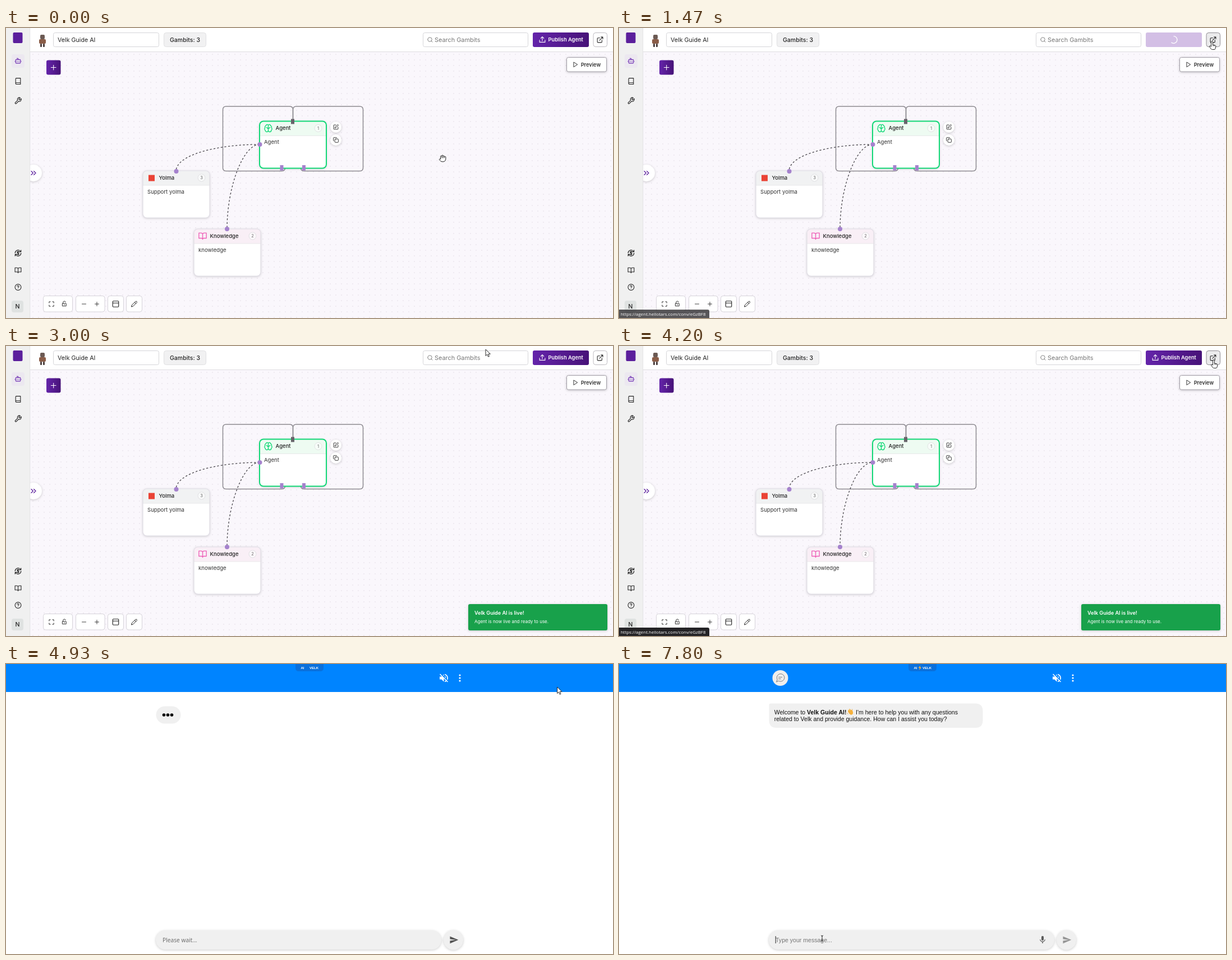
Animation, 1082 px wide and 518 px high, one loop 8 s. Source, as an HTML page:

```html
<!DOCTYPE html>
<html lang="en">
<head>
<meta charset="utf-8">
<title>Publishing an agent</title>
<style>
  html, body { margin: 0; width: 100%; height: 100%; overflow: hidden; background: #fff; }
  svg { display: block; width: 100vw; height: 100vh; }
  text { white-space: pre; }
  .ui { font-family: Inter, sans-serif; }
  .sys { font-family: "Open Sans", "Noto Sans", sans-serif; }
  .chat { font-family: "Liberation Sans", Arial, sans-serif; }
  .soft { filter: drop-shadow(0 1px 2px #0003); }
  .dash { fill: none; stroke: #4a474d; stroke-width: 1.3; stroke-dasharray: 3.3; }
</style>
</head>
<body>
<svg id="stage" viewBox="0 0 1082 518" preserveAspectRatio="none"></svg>
<script>
const LOOP = 8000;
const PURPLE = '#5b1f9c';

const rect = (x, y, w, h, r, fill, stroke = 'none', more = '') =>
  `<rect x="${x}" y="${y}" width="${w}" height="${h}" rx="${r}" fill="${fill}" stroke="${stroke}" ${more}/>`;
const dot = (x, y, r, fill, more = '') =>
  `<circle cx="${x}" cy="${y}" r="${r}" fill="${fill}" ${more}/>`;
const path = (d, fill, stroke = 'none', more = '') =>
  `<path d="${d}" fill="${fill}" stroke="${stroke}" ${more}/>`;
const text = (s, x, y, size, fill = '#222', weight = 400, cls = 'ui', more = '') =>
  `<text class="${cls}" x="${x}" y="${y}" font-size="${size}" fill="${fill}" font-weight="${weight}" ${more}>${s}</text>`;
const group = (id, body) => `<g id="${id}">${body}</g>`;

// Icons live on a 24-unit grid and are placed by their centre.
const place = (x, y, size) => `transform="translate(${x - size / 2} ${y - size / 2}) scale(${size / 24})"`;
const line = (d, x, y, size, color = '#222', w = 2) =>
  path(d, 'none', color, `${place(x, y, size)} stroke-width="${w}" stroke-linecap="round" stroke-linejoin="round"`);
const solid = (d, x, y, size, color, more = '') => path(d, color, 'none', place(x, y, size) + more);

const ICON = {
  bot: 'M12 8V4H8M6 8h12a2 2 0 0 1 2 2v8a2 2 0 0 1-2 2H6a2 2 0 0 1-2-2v-8a2 2 0 0 1 2-2zM2 14h2M20 14h2M15 13v2M9 13v2',
  book: 'M4 19.5v-15A2.5 2.5 0 0 1 6.5 2H20v20H6.5a2.5 2.5 0 0 1 0-5H20',
  wrench: 'M14.7 6.3a1 1 0 0 0 0 1.4l1.6 1.6a1 1 0 0 0 1.4 0l3.77-3.77a6 6 0 0 1-7.94 7.94l-6.91 6.91a2.12 2.12 0 0 1-3-3l6.91-6.91a6 6 0 0 1 7.94-7.94z',
  credit: 'M3 12a9 9 0 0 1 15-6.7L21 8M21 3v5h-5M21 12a9 9 0 0 1-15 6.7L3 16M3 21v-5h5M15 9q-1-1.5-3-1.5c-4 0-4 4 0 4.5s4 4.5 0 4.5q-2 0-3-1.5M12 6v12',
  open: 'M12 7v14M12 7q-1-3-4-3H2v14h7q3 0 3 3q0-3 3-3h7V4h-6q-3 0-4 3',
  help: 'M2 12a10 10 0 1 0 20 0a10 10 0 1 0-20 0M9 9a3 3 0 0 1 5.8 1c0 2-3 3-3 3M12 17h.01',
  search: 'M3 11a8 8 0 1 0 16 0a8 8 0 1 0-16 0M21 21l-4.3-4.3',
  upload: 'M3 14v7h18v-7M17 8l-5-5-5 5M12 3v13',
  external: 'M15 3h6v6M10 14L21 3M18 13v6a2 2 0 0 1-2 2H5a2 2 0 0 1-2-2V8a2 2 0 0 1 2-2h6',
  play: 'M6 3l14 9-14 9z',
  plus: 'M4 12h16M12 4v16',
  minus: 'M4 12h16',
  more: 'M6 17l5-5-5-5M13 17l5-5-5-5',
  brain: 'M12 5a3 3 0 1 0-6 .1a4 4 0 0 0-2.5 5.8a4 4 0 0 0 .5 6.6A4 4 0 1 0 12 18zM12 5a3 3 0 1 1 6 .1a4 4 0 0 1 2.5 5.8a4 4 0 0 1-.5 6.6A4 4 0 1 1 12 18M7 10q3 0 3 3M17 10q-3 0-3 3',
  edit: 'M12 3H5a2 2 0 0 0-2 2v14a2 2 0 0 0 2 2h14a2 2 0 0 0 2-2v-7M18.4 2.6a2 2 0 0 1 3 3L12 15l-4 1 1-4z',
  copy: 'M10 8h10a2 2 0 0 1 2 2v10a2 2 0 0 1-2 2H10a2 2 0 0 1-2-2V10a2 2 0 0 1 2-2zM4 16a2 2 0 0 1-2-2V4q0-2 2-2h10a2 2 0 0 1 2 2',
  fit: 'M3 8V3h5M16 3h5v5M21 16v5h-5M8 21H3v-5',
  lock: 'M5 11h14v10H5zM7 11V7a5 5 0 0 1 9.9-1M12 15v2',
  panel: 'M5 3h14a2 2 0 0 1 2 2v14a2 2 0 0 1-2 2H5a2 2 0 0 1-2-2V5a2 2 0 0 1 2-2zM3 9h18',
  pencil: 'M17 3a2.8 2.8 0 0 1 4 4L7.5 20.5 2 22l1.5-5.5zM14 6l4 4',
  mute: 'M16.5 12c0-1.77-1.02-3.29-2.5-4.03v2.21l2.45 2.45zM19 12c0 .94-.2 1.82-.54 2.64l1.51 1.51C20.63 14.91 21 13.5 21 12c0-4.28-2.99-7.86-7-8.77v2.06c2.89.86 5 3.54 5 6.71zM4.27 3L3 4.27 7.73 9H3v6h4l5 5v-6.73l4.25 4.25q-1 .8-2.25 1.18v2.06q2-.45 3.69-1.81L19.73 21 21 19.73zM12 4L9.91 6.09 12 8.18z',
  send: 'M2 21L23 12 2 3v7l15 2-15 2z',
  mic: 'M12 14a3 3 0 0 0 3-3V5a3 3 0 0 0-6 0v6a3 3 0 0 0 3 3zM17.3 11c0 3-2.54 5.1-5.3 5.1S6.7 14 6.7 11H5c0 3.41 2.72 6.23 6 6.72V21h2v-3.28c3.28-.48 6-3.3 6-6.72z',
  message: 'M3 21l1.9-5.5a9 9 0 1 1 3.6 3.6zM8 10h8M8 14h5'
};

function card(x, y, title, body, count, head, border, w, mark) {
  return rect(x, y, 119, 84, 7, '#fff', 'none', 'class="soft"') +
    path(`M${x} ${y + 26}v-19q0-7 7-7h105q7 0 7 7v19z`, head) +
    path(`M${x} ${y + 26}h119`, 'none', '#e2e0e4', 'stroke-width=".7"') +
    rect(x, y, 119, 84, 7, 'none', border, `stroke-width="${w}"`) + mark +
    text(title, x + 28.5, y + 15.7, 9.5, '#222', 500) +
    text(body, x + 8, y + 40.5, 9.6, '#333') +
    dot(x + 104.5, y + 12.5, 6.5, '#fff8', 'stroke="#dcdcdf" stroke-width=".8"') +
    text(count, x + 104.5, y + 15.3, 7.5, '#666', 400, 'ui', 'text-anchor="middle"');
}

function editor() {
  const tool = (x, w) => rect(x, 478.5, w, 28.5, 4, '#fff', '#d6d3da');
  const loopEdge = side => path(
    `M511.5 166V146q0-6 ${side * 6}-6h${side * 113}q${side * 6} 0 ${side * 6} 6v103.5q0 6 ${-side * 6} 6h${-side * 99}q${-side * 6} 0 ${-side * 6}-6`,
    'none', '#8d8a90', 'stroke-width="1.5"');
  return rect(0, 0, 1082, 518, 0, '#faf7fc') + rect(43, 42, 1039, 476, 0, 'url(#dots)') +
    // header
    rect(43, 0, 1039, 42, 0, '#fff') + path('M43 42.5H1082', 'none', '#dedce0') +
    rect(61, 12, 8, 8, 2, '#6b5a54') + rect(59, 20, 12, 8, 2, '#8a5d48') +
    rect(61, 28, 3, 6, 1, '#4b3f3e') + rect(66, 28, 3, 6, 1, '#4b3f3e') +
    rect(84.5, 8.5, 188, 25, 3, '#fff', '#d5d5d8') + text('Velk Guide AI', 92, 25, 10.7) +
    rect(281.5, 8.5, 75, 25, 4, '#f1f1f2', '#e0e0e2') + text('Gambits: 3', 292, 25, 10.5, '#222', 500) +
    rect(743.5, 8.5, 187, 25, 3, '#fff', '#d5d5d8') + line(ICON.search, 756, 21, 11, '#777') +
    text('Search Gambits', 764, 25, 10.9, '#777') +
    group('publish', rect(939, 8, 100, 26, 3, 'url(#violet)') + line(ICON.upload, 956, 20.5, 13, '#fff') +
      text('Publish Agent', 966.5, 24.3, 9.3, '#fff', 600)) +
    group('loading', rect(939, 8, 100, 26, 3, '#d3bfe5') +
      path('M0-6.3a6.3 6.3 0 1 1-4 11', 'none', '#fff', 'id="spinner" stroke-width="1.3"')) +
    rect(1047, 8.5, 24.5, 25, 4, '#fff', '#bdbbc0', 'id="openBtn"') + line(ICON.external, 1059, 21, 13) +
    // canvas
    rect(72, 57.5, 25.5, 26, 3, 'url(#violet)') + line(ICON.plus, 84.7, 70.5, 13, '#fff') +
    rect(999.5, 52.5, 71, 25.5, 3, '#fff', '#a09ca5', 'class="soft"') +
    line(ICON.play, 1015, 65.3, 11) + text('Preview', 1024.7, 68.6, 9.2, '#333', 600) +
    loopEdge(-1) + loopEdge(1) +
    card(244, 255, 'Yolma', 'Support yolma', 3, '#f1f2f3', '#e2dfe7', 1.2, rect(254, 262.5, 11, 11, 0, '#ea4335')) +
    card(335, 359, 'Knowledge', 'knowledge', 2, '#f9eff6', '#e2dfe7', 1.2, line(ICON.open, 350.5, 371.5, 16, '#ee5fb7')) +
    card(452, 166.5, 'Agent', 'Agent', 1, '#eefbf2', '#12d877', 2, line(ICON.brain, 467.5, 179, 16, '#12d877')) +
    path('M452 208C378 208 303 226 303 256', 'none', 'none', 'class="dash"') +
    path('M452 208C423 208 394 283 394 359', 'none', 'none', 'class="dash"') +
    rect(508, 162.5, 6, 9, 0, '#67636a') + rect(488.5, 245, 6, 9.5, 0, '#a582cd') + rect(528, 245, 6, 9.5, 0, '#a582cd') +
    dot(452.5, 208, 4, '#a582cd') + dot(303.5, 256, 4, '#a582cd') + dot(394, 359, 4, '#a582cd') +
    dot(588, 177, 10, '#fff', 'class="soft"') + line(ICON.edit, 588, 177, 10.5) +
    dot(588, 200, 10, '#fff', 'class="soft"') + line(ICON.copy, 588, 200, 10.5) +
    tool(66.5, 52) + line(ICON.fit, 81, 493, 11) + line(ICON.lock, 104, 492.5, 11) +
    tool(124.5, 51.5) + line(ICON.minus, 139, 493, 10.5) + line(ICON.plus, 162, 493, 10.5) +
    tool(181.5, 28) + line(ICON.panel, 195.5, 493, 14) + tool(214.5, 28) + line(ICON.pencil, 228.5, 493, 12) +
    // sidebar
    dot(49, 259, 15, '#fff', 'class="soft"') +
    rect(0, 0, 43, 518, 0, '#f0f0f0') + path('M42.7 0V518', 'none', '#dedee0', 'stroke-width=".8"') +
    line(ICON.more, 49, 259, 16, PURPLE) +
    rect(12.5, 8, 17, 19, 2, PURPLE) + rect(10, 47, 23, 24, 4, '#ece8f0') +
    line(ICON.bot, 21.5, 58.5, 13, '#6b2bb0') + line(ICON.book, 21.5, 95, 13) + line(ICON.wrench, 21.5, 130, 14) +
    line(ICON.credit, 21.5, 402, 14) + line(ICON.open, 21.5, 432.5, 13) + line(ICON.help, 21.5, 463, 13) +
    rect(10, 487, 21, 21, 4, '#dfe2e1') + text('N', 20.5, 501.3, 10.5, '#222', 500, 'ui', 'text-anchor="middle"') +
    // overlays
    group('toast', rect(824, 461, 248, 47, 3, '#18a14b', 'none', 'class="soft"') +
      text('Velk Guide AI is live!', 835, 480.3, 9.1, '#fff', 600) +
      text('Agent is now live and ready to use.', 835, 494.5, 8, '#fff')) +
    group('status', path('M0 503H158q3 0 3 3V518H0z', '#242326') +
      text('https://agent.hellotars.com/conv/eGzBF8', 3, 513.5, 7.95, '#fff', 400, 'sys'));
}

function chat() {
  return rect(0, 0, 1082, 518, 0, '#fff') +
    group('chatUi', rect(0, 0, 1082, 50, 0, '#0084ff') +
      path('M516 0H566V7q0 6-6 6H522q-6 0-6-6z', '#0a70dc') +
      text('AI', 525.5, 8.7, 6, '#fff', 700, 'chat') + text('VELK', 541, 8.7, 6, '#fff', 700, 'chat') +
      path('M537.5 2.5l-4 4.5h2.5l-1 4 4-5h-2.5z', '#ffb13b', 'none', 'id="bolt"') +
      solid(ICON.mute, 780.5, 25, 20, '#fff') + [20, 25, 30].map(y => dot(809, y, 1.6, '#fff')).join('') +
      group('avatar', dot(287.5, 25, 14, '#f0eeec') + line(ICON.message, 287.5, 25, 18, '#75777c', 1.3)) +
      rect(267, 476, 509, 34, 17, '#f0f0f0', 'none', 'class="soft"') + dot(797.5, 493, 17.5, '#f0f0f0', 'class="soft"') +
      solid(ICON.send, 798.5, 492.8, 17, '#555', ' id="send"') +
      group('wait', text('Please wait...', 279, 497, 10.25, '#666', 400, 'sys')) +
      group('ready', text('Type your message...', 279, 496.7, 10.55, '#757575', 400, 'chat') +
        solid(ICON.mic, 755, 492.7, 16.5, '#5c5c5c')) +
      rect(278.7, 486, 1, 13, 0, '#222', 'none', 'id="caret"')) +
    group('typing', rect(267.5, 75.5, 44, 31, 15.5, '#f0f0f0') + [281.5, 288.5, 295.5].map(x => dot(x, 91, 2.8, '#000')).join('')) +
    group('bubble', path('M270.5 70.5H635q13.5 0 13.5 13.5v16.5q0 13.5-13.5 13.5H281q-13.5 0-13.5-13.5v-27q0-3 3-3z', '#f0f0f0')) +
    group('words', text('Welcome to ', 276.7, 89.7, 10.55, '#111', 400, 'chat') +
      text('Velk Guide AI!', 335, 89.7, 10.55, '#111', 700, 'chat') +
      path('M408 85l2 3q2 3.5 5 2.5t2-5l-1.5-4-2 1-2-2.5q-1.5-.5-1 1l1 2.5-2-2q-1.5 0-1 1.5z', '#f5b13d') +
      path('M406.5 87l2 3M415 80.5l1.5 1', 'none', '#d99a35', 'stroke-width=".7"') +
      text("I'm here to help you with any questions", 422, 89.7, 10.55, '#111', 400, 'chat') +
      text('related to Velk and provide guidance. How can I assist you today?', 276.7, 102.2, 10.55, '#111', 400, 'chat'));
}

function cursors() {
  const ink = 'stroke-width=".9" stroke-linejoin="round"';
  const arrow = 'M0 0V11.5L2.7 9 4.5 13.2 6.4 12.4 4.7 8.3H8.3z';
  const hand = 'M18 10V6a2 2 0 0 0-4 0V4a2 2 0 0 0-4 0v2a2 2 0 0 0-4 0v8.5l-1-1a2 2 0 0 0-2.6 2.5l4 4Q8 22 12 22h2a8 8 0 0 0 8-8V8a2 2 0 0 0-4 0M10 6v5M14 6v5';
  return group('arrow', path(arrow, '#fff', '#111', ink)) +
    group('plain', path(arrow, '#fff', 'none', 'transform="scale(.9)"')) +
    group('grab', path(hand, '#fff', '#111', `${place(0, 0, 14)} stroke-width="1.6"`)) +
    group('point', path('M-1.4 1.2a1.4 1.4 0 0 1 2.8 0V6l4 .8q1.6.4 1.4 2l-.6 3.5q-.4 2.2-2.2 2.2H.6q-1.5 0-2.3-1.2L-4.5 9.3q-.2-1.9 1.6-1.2l1.5 1zM2 6v2.5M4.3 6.5v2', '#fff', '#111', ink)) +
    group('beam', path('M-2-4q2 0 2 1.5q0-1.5 2-1.5M0-3V5M-2 6q2 0 2-1.5q0 1.5 2 1.5', 'none', '#111', ink));
}

stage.innerHTML = `<defs>
  <pattern id="dots" x="43" y="42" width="10" height="10" patternUnits="userSpaceOnUse">${dot(5, 5, .65, '#d8d1dc')}</pattern>
  <linearGradient id="violet"><stop stop-color="#6424aa"/><stop offset="1" stop-color="#471278"/></linearGradient>
</defs>` + rect(0, 0, 1082, 518, 0, '#3b393d') +
  group('editor', editor()) + group('chat', chat()) + group('cursor', cursors());

const $ = id => document.getElementById(id);
const show = (id, on) => { $(id).style.opacity = +on; };
const ramp = (t, a, b) => Math.min(1, Math.max(0, (t - a) / (b - a)));
const ease = p => p * p * (3 - 2 * p);

// time, x, y; a trailing 1 keeps the approach at constant speed
const route = [
  [0, 778, 233], [70, 778, 233], [800, 990, 24], [1000, 990, 24], [1380, 1057, 24],
  [1750, 1057, 24], [2500, 855, 6], [3520, 855, 6], [4060, 1060, 25], [4600, 1060, 25],
  [4930, 983, 41, 1], [5400, 790, 66, 1], [5730, 718, 65, 1], [5929, 718, 65], [5930, 718, 66],
  [6190, 718, 66], [6800, 136, 519], [6801, 360, 526], [7430, 360, 526], [7790, 362, 489]
];
function pointer(t) {
  const i = route.findIndex(k => k[0] > t);
  if (i < 0) return route.at(-1).slice(1);
  const [a, b] = [route[i - 1], route[i]];
  const p = ramp(t, a[0], b[0]), q = b[3] ? p : ease(p);
  return [a[1] + (b[1] - a[1]) * q, a[2] + (b[2] - a[2]) * q];
}

function draw(t) {
  const [x, y] = pointer(t);
  const onEditor = t < 4270, onChat = t >= 4600;
  const overPublish = onEditor && x > 939 && x < 1039 && y > 8 && y < 34;
  const overOpen = onEditor && x > 1047 && y > 8 && y < 34;

  $('editor').style.display = onEditor ? '' : 'none';
  $('chat').style.display = onChat ? '' : 'none';

  const loading = t >= 1000 && t < 2680;
  show('loading', loading);
  show('publish', loading ? 0 : overPublish ? .9 : 1);
  $('spinner').setAttribute('transform', `translate(988.5 21) rotate(${(t - 1470) * .36})`);
  $('openBtn').setAttribute('fill', overOpen ? '#ebebec' : '#fff');
  $('openBtn').setAttribute('stroke', overOpen ? '#8e8b91' : '#bdbbc0');
  show('status', Math.max(ramp(t, 1380, 1500) - ramp(t, 1950, 2100), ramp(t, 4030, 4160)));
  const rise = ease(ramp(t, 2680, 2900));
  show('toast', rise);
  $('toast').setAttribute('transform', `translate(0 ${(1 - rise) * 40})`);
  for (const edge of document.querySelectorAll('.dash')) edge.style.strokeDashoffset = -t / 500 * 6.6;

  show('chatUi', t >= 4670);
  show('typing', t >= 4800 && t < 5270);
  show('bolt', ramp(t, 5070, 5270));
  show('avatar', ramp(t, 5200, 5330));
  show('bubble', ramp(t, 5270, 5390));
  show('words', ramp(t, 5440, 5600));
  show('wait', t < 5700);
  show('ready', t >= 5700);
  $('send').setAttribute('fill', t < 5700 ? '#555' : '#969696');
  show('caret', t >= 5700 && Math.floor((t - 5700) / 500) % 2 === 0);

  let kind = 'arrow';
  if (onEditor) kind = y > 42 ? 'grab' : overPublish || overOpen ? 'point' : 'arrow';
  else if (!onChat) kind = 'plain';
  else if (x > 267 && x < 776 && y > 476 && y < 510) kind = 'beam';
  for (const id of ['arrow', 'plain', 'grab', 'point', 'beam']) show(id, id === kind);
  $('cursor').setAttribute('transform', `translate(${x} ${y})`);
}

function tick() {
  draw(performance.now() % LOOP);
  requestAnimationFrame(tick);
}
tick();
</script>
</body>
</html>
```
